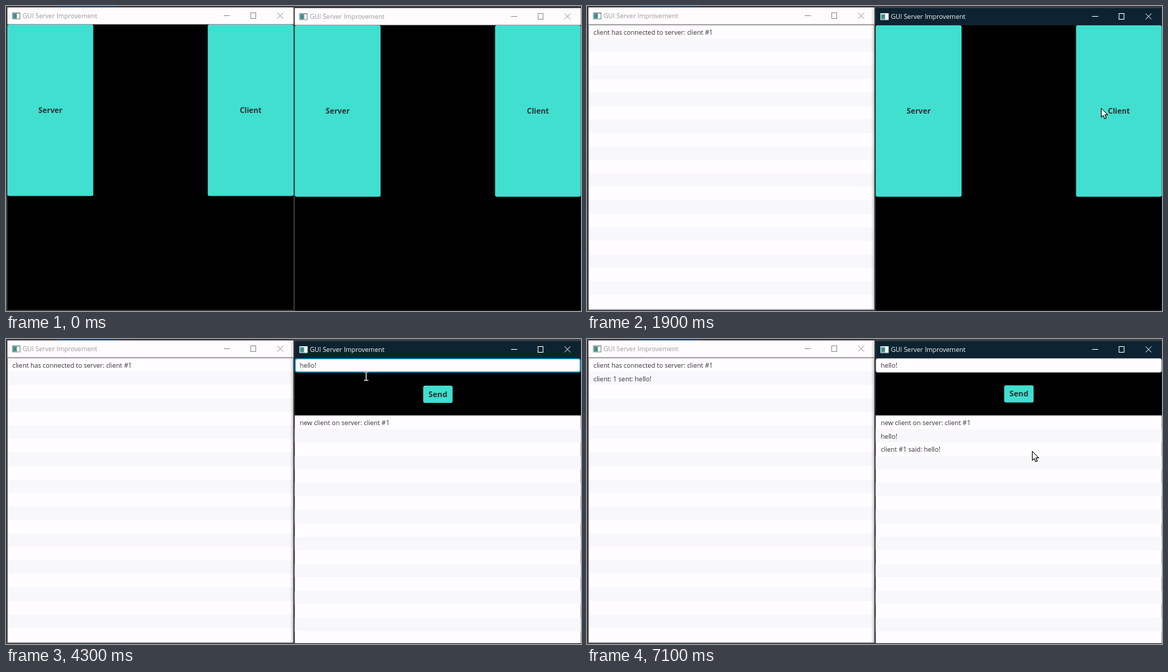
Animation, 800 px wide and 425 px high, one loop 7.2 s. Source, as an HTML page with a canvas:

```html
<!DOCTYPE html>
<html lang="en">
<head>
<meta charset="utf-8">
<title>GUI Server Improvement</title>
<style>
html, body { margin: 0; width: 100%; height: 100%; overflow: hidden; background: #3b3b3f; }
canvas { display: block; }
</style>
</head>
<body>
<canvas id="stage" width="800" height="425"></canvas>
<script>
const c = document.getElementById('stage').getContext('2d');
const LOOP = 7200, STEP = 100, ROW = 18.8, W = 398;
const TEAL = '#40dfd0', FOCUS = '#0d9bd0', INK = '#333', PAPER = '#fffdff';

// Pointer stops: time, x, y
const stops = [
  [100, 330, 408], [800, 74, 200], [1100, 74, 200], [1700, 715, 142], [1900, 715, 142],
  [2400, 501, 52], [4500, 501, 52], [5000, 604, 76], [5400, 604, 76], [5600, 619, 156], [LOOP, 619, 156]
];
const typed = [[3000, 'h'], [3100, 'he'], [3300, 'hel'], [3400, 'hell'], [3600, 'hello'], [3800, 'hello!']];
const serverLog = [[1900, 'client has connected to server: client #1'], [5100, 'client: 1 sent: hello!']];
const clientLog = [[2000, 'new client on server: client #1'], [5100, 'hello!'], [5200, 'client #1 said: hello!']];

const shown = (list, t) => list.filter(e => t >= e[0]).map(e => e[1]);

function rect(x, y, w, h, fill) {
  c.fillStyle = fill;
  c.fillRect(x, y, w, h);
}

function round(x, y, w, h, r, fill) {
  c.fillStyle = fill;
  c.beginPath();
  c.roundRect(x, y, w, h, r);
  c.fill();
}

function text(s, x, y, fill = INK, font = '9px', align = 'left') {
  c.font = font + ' "Open Sans", "Noto Sans", sans-serif';
  c.textAlign = align;
  c.fillStyle = fill;
  c.fillText(s, x, y);
}

function line(points, color, close) {
  c.beginPath();
  points.forEach(p => c.lineTo(p[0], p[1]));
  if (close) c.closePath();
  c.strokeStyle = color;
  c.lineWidth = 1;
  c.stroke();
}

function button(label, x, y, w, h, size) {
  round(x, y, w, h, 2.5, TEAL);
  text(label, x + w / 2, y + h / 2 + 3.8, '#2b3132', 'bold ' + size + 'px', 'center');
}

function titleBar(active) {
  rect(0, 0, W, 23.5, active ? '#0d2331' : '#fffcfe');
  rect(6.5, 7, 11.5, 9.5, active ? '#e8eeee' : '#8b9294');
  rect(7.5, 8.5, 9.5, 7, '#f4f7f7');
  rect(7.5, 8.5, 5.5, 7, '#3f8f8a');
  text('GUI Server Improvement', 21, 15, active ? '#f2f4f5' : '#999');
  const color = active ? '#e6eaec' : '#999';
  line([[301, 11.5], [309.5, 11.5]], color);
  c.strokeRect(338.5, 7.5, 7, 8);
  line([[375.5, 7.5], [383.5, 15.5]], color);
  line([[375.5, 15.5], [383.5, 7.5]], color);
}

function menu() {
  button('Server', 0, 23.7, 119.5, 239, 10.4);
  button('Client', 278.7, 23.7, 119.3, 239, 10.4);
}

function list(top, bottom, rows) {
  rect(0, top, W, bottom - top, PAPER);
  for (let y = top + ROW; y < bottom; y += 2 * ROW)
    rect(0, y, W, Math.min(ROW, bottom - y), '#f8f7f9');
  rows.forEach((s, i) => text(s, 7, top + 13.2 + i * ROW));
}

function serverView(t) {
  const rows = shown(serverLog, t);
  if (rows.length) list(24.5, 421, rows);
  else rect(0, 24, W, 397, PAPER);
  c.strokeStyle = t < 1800 ? FOCUS : '#c4c2c5';
  c.lineWidth = t < 1800 ? 1.6 : 1;
  c.strokeRect(0.5, 24, W - 1, 397);
}

function clientView(t) {
  const focused = t < 5000, value = shown(typed, t).pop() || '';
  round(0, 23.7, W, 20, 3, focused ? FOCUS : '#c6c6c8');
  const inset = focused ? 1.5 : 0.8;
  round(inset, 23.7 + inset, W - 2 * inset, 20 - 2 * inset, 2, PAPER);
  text(value, 7, 37);
  const caretOn = t >= 3000 && focused && (t < 4300 || t >= 4800);
  if (caretOn) rect(7 + c.measureText(value).width, 27.5, 1, 12.5, '#111');
  button('Send', 178.7, focused ? 62 : 61.5, 41, 24, 10.8);
  list(103.5, 421, shown(clientLog, t));
}

function frameWindow(x, y, active, view, t) {
  c.save();
  c.translate(x, y);
  rect(0, 23.5, W, 398, '#000');
  view(t);
  titleBar(active);
  c.restore();
}

function shadow(from, to, alpha) {
  const g = c.createLinearGradient(from, 0, to, 0);
  g.addColorStop(0, 'rgba(0,0,0,' + alpha + ')');
  g.addColorStop(1, 'rgba(0,0,0,0)');
  rect(Math.min(from, to), 2, Math.abs(to - from), 422, g);
}

function pointerAt(t) {
  const i = stops.findIndex(s => s[0] > t);
  const [t0, x0, y0] = stops[i - 1], [t1, x1, y1] = stops[i];
  let k = (t - t0) / (t1 - t0);
  k = k * k * (3 - 2 * k);
  return [x0 + (x1 - x0) * k, y0 + (y1 - y0) * k];
}

function pointer(t) {
  if (t < stops[0][0]) return;
  const [x, y] = pointerAt(t);
  c.save();
  c.translate(x, y);
  if (t >= 2400 && t < 4600) {
    c.globalCompositeOperation = 'difference';
    rect(-0.5, -5, 1.2, 10, '#fff');
    rect(-3, -6, 6.2, 1, '#fff');
    rect(-3, 5, 6.2, 1, '#fff');
  } else {
    const arrow = [[0.5, 0.5], [0.5, 13], [3.3, 10.3], [5.3, 15], [7.4, 14.1], [5.5, 9.6], [9.4, 9.6]];
    c.fillStyle = '#fff';
    c.lineJoin = 'round';
    line(arrow, '#000', true);
    c.fill();
    line(arrow, '#111', true);
  }
  c.restore();
}

function draw(t) {
  rect(0, 0, 800, 425, '#3c3c41');
  rect(70, 0, 85, 1.3, '#1f4f7c');
  const leftActive = t >= 1000 && t < 1800, rightActive = t >= 1800;
  frameWindow(2, 2, leftActive, t < 1100 ? menu : serverView, t);
  frameWindow(401.7, 3, rightActive, t < 2000 ? menu : clientView, t);
  if (leftActive) shadow(401, 409, 0.25);
  if (rightActive) shadow(401, 395, 0.2);
  pointer(t);
}

const start = performance.now();
function tick() {
  const t = (performance.now() - start) % LOOP;
  draw(Math.floor(t / STEP) * STEP);
  requestAnimationFrame(tick);
}
tick();
</script>
</body>
</html>
```
